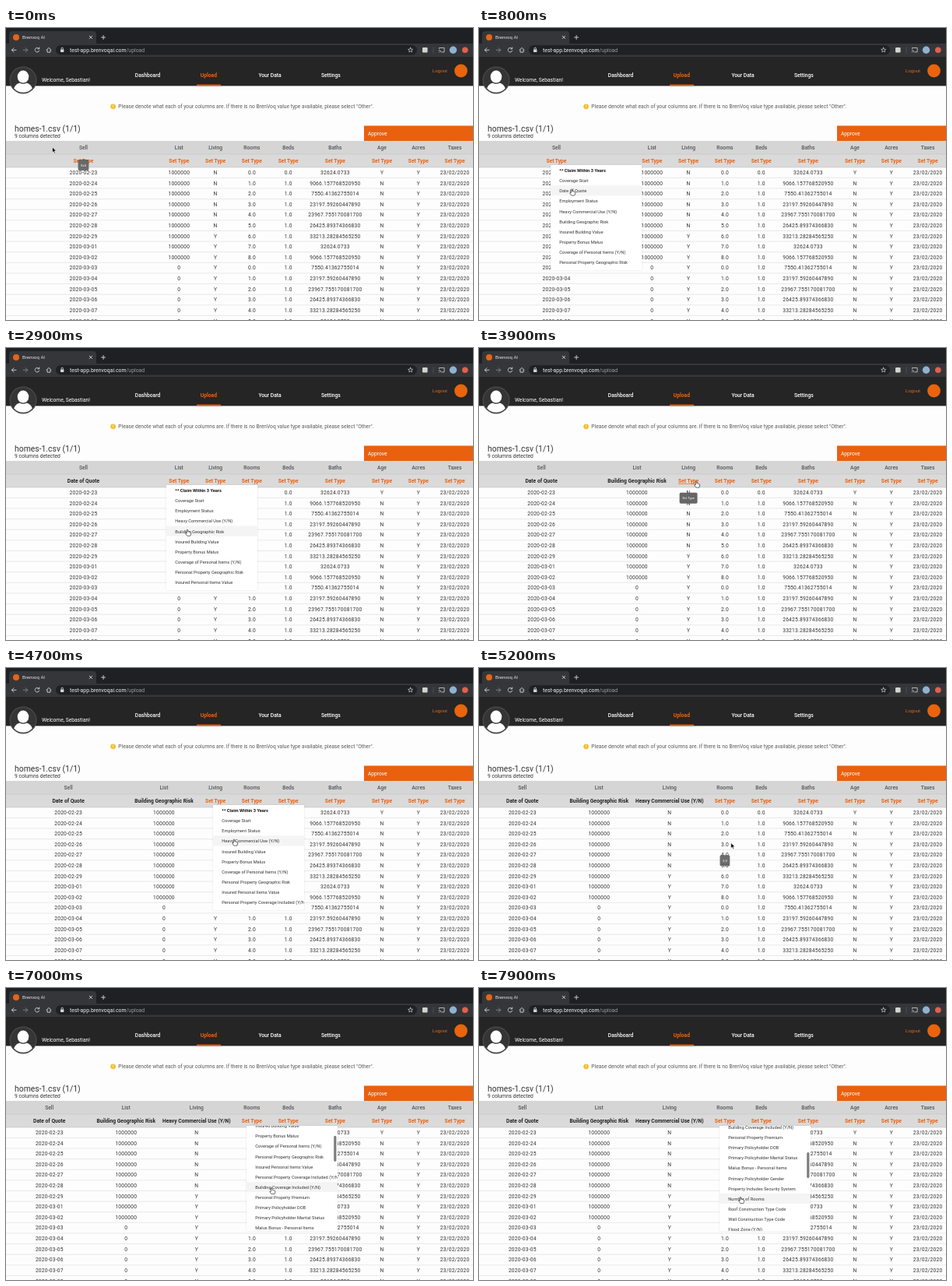
Animation, 600 px wide and 375 px high, one loop 8000 ms. Source, as an HTML page:

```html
<!DOCTYPE html>
<html lang="en">
<head>
<meta charset="utf-8">
<title>Column types</title>
<style>
html, body { margin: 0; width: 100%; height: 100%; overflow: hidden; background: #fdfdfd; }
svg { display: block; font-family: Roboto, "Open Sans", sans-serif; }
#stage { width: 600px; height: 375px; }
text { font-size: 6.7px; fill: #333; white-space: pre; }
.mid { text-anchor: middle; }
.num { letter-spacing: .2px; }
.head { font-weight: 500; fill: #555; }
.type { font-weight: 700; fill: #222; }
.type.unset { fill: #ea6314; }
.type.over { text-decoration: underline; }
.nav { font-weight: 500; fill: #fff; }
.item { font-size: 5.7px; fill: #333; }
.item.first { font-weight: 700; fill: #111; }
.menu { filter: drop-shadow(0 .5px 1px rgba(0, 0, 0, .1)); }
.tip text { font-size: 4.2px; fill: #fff; }
.line { fill: none; stroke: #d4d5d7; stroke-width: .9; stroke-linecap: round; stroke-linejoin: round; }
</style>
</head>
<body>
<svg id="stage" viewBox="0 0 600 375">
  <!-- browser bar -->
  <rect width="600" height="21" fill="#1f2023"/>
  <path d="M1 21Q4 21 4 18V8Q4 4 8 4H112Q116 4 116 8V18Q116 21 119 21Z" fill="#35363a"/>
  <rect y="20" width="600" height="17" fill="#35363a"/>
  <circle cx="13" cy="12" r="4" fill="#e8640f"/>
  <text x="21" y="14.1" style="font-size:6px;fill:#e4e5e7">Brenvoq AI</text>
  <path class="line" d="M107.2 10.2l3.4 3.4m0-3.4l-3.4 3.4M122.6 12h5M125.1 9.5v5"/>
  <path class="line" d="M13 28.3H7.5M10 25.7L7.4 28.3L10 30.9"/>
  <path class="line" d="M22.2 28.3h5.5M25.2 25.7l2.6 2.6l-2.6 2.6" style="stroke:#85878a"/>
  <path class="line" d="M42.4 26.6a2.8 2.8 0 1 0 .3 2.6M42.7 25v1.9h-1.9"/>
  <path class="line" d="M52 28.3L55 25.4L58 28.3M53 28v3.1h4V28"/>
  <rect x="64" y="22" width="464" height="12.6" rx="6.3" fill="#202124"/>
  <rect x="70" y="27.6" width="4.4" height="3.4" rx=".5" fill="#d4d5d7"/>
  <path class="line" d="M71 27.4v-1a1.2 1.2 0 0 1 2.4 0v1"/>
  <text x="82" y="30.6" style="font-size:6.9px;fill:#f0f0f1">test-app.brenvoqai.com<tspan fill="#9a9ca0">/upload</tspan></text>
  <path class="line" d="M519.7 25.2l.9 2 2.2.2-1.7 1.4.5 2.1-1.9-1.1-1.9 1.1.5-2.1-1.7-1.4 2.2-.2Z" style="stroke-width:.7"/>
  <rect x="535" y="24.9" width="6.6" height="6.6" rx="1.2" fill="#cfd6d0"/>
  <path d="M549 24.5v8" stroke="#5d5e62" stroke-width=".6"/>
  <path class="line" d="M556.5 26.5v-1h6.6v5.4h-3M556.5 28.4a2.6 2.6 0 0 1 2.4 2.5M556.5 30.6v.3" style="stroke-width:.8"/>
  <circle cx="574.5" cy="28.3" r="4.7" fill="#8fb2cf"/>
  <circle cx="589.8" cy="28.3" r="3.8" fill="#e2604a"/>
  <!-- page header -->
  <rect y="37" width="600" height="37.4" fill="#252525"/>
  <rect x="245" y="72.6" width="31" height="1.8" fill="#ea6314"/>
  <circle cx="22" cy="67" r="17.5" fill="#4a4a4b"/>
  <circle cx="22" cy="67" r="16.2" fill="#353535"/>
  <ellipse cx="22" cy="62.6" rx="7.3" ry="8" fill="#fff"/>
  <path d="M10.2 77.6Q12 71.6 17.5 70.4Q22 73 26.5 70.4Q32 71.6 33.8 77.6A15.9 15.9 0 0 1 10.2 77.6Z" fill="#fff"/>
  <text x="46" y="68.9" style="fill:#fff">Welcome, Sebastian!</text>
  <text class="nav mid" x="182" y="63.3">Dashboard</text>
  <text class="nav mid" x="260.4" y="63.3" style="fill:#ea6314;font-weight:700">Upload</text>
  <text class="nav mid" x="339" y="63.3">Your Data</text>
  <text class="nav mid" x="417.3" y="63.3">Settings</text>
  <text class="mid" x="557.5" y="57.4" style="font-size:6.2px;fill:#ea6314">Logout</text>
  <circle cx="584.5" cy="55" r="8.4" fill="#e8640f"/>
  <!-- notice and title -->
  <circle cx="137.6" cy="100.8" r="3.4" fill="#f3c02c"/>
  <path d="M137.6 98.9v2.2m0 1.2v.5" stroke="#fff" stroke-width=".8"/>
  <text x="144.3" y="103.1" style="fill:#5a5a5a">Please denote what each of your columns are. If there is no BrenVoq value type available, please select "Other".</text>
  <text x="11" y="132.6" style="font-size:10.4px">homes-1.csv (1/1)</text>
  <text x="11" y="140.9">9 columns detected</text>
  <rect x="460" y="125.5" width="140" height="19.5" fill="#e9600f"/>
  <text x="465" y="138" style="fill:#fff">Approve</text>
  <!-- table bands -->
  <rect y="145" width="600" height="17" fill="#d5d5d5"/>
  <rect y="162" width="600" height="17" fill="#dadada"/>
  <path d="M0 162H600M0 179H600" stroke="#c3c3c3" stroke-width=".6"/>
  <g id="table"></g>
  <g id="menus"></g>
  <g id="tips"></g>
  <g id="cursor" stroke-width=".6" stroke-linejoin="round">
    <path id="arrow" d="M0 0V7L1.6 5.5L2.6 7.9L3.8 7.4L2.8 5.1H5Z" fill="#000" stroke="#fff"/>
    <path id="hand" d="M-.8 .5Q0-.5 .8 .5V3Q1.6 2.6 2.1 3.2Q3 2.9 3.4 3.6Q4.5 3.4 4.6 4.5V6L3.8 8.2H-.2L-2.4 5.1Q-2.2 4-.8 5Z" fill="#fff" stroke="#111"/>
  </g>
</svg>
<script>
const LOOP = 8000, STEP = 100;
const ROWS = 15, PITCH = 13.615, FIRST_ROW = 185.5, HEADER = 171, COL_W = 46.8;
const MENU_W = 117, MENU_H = 135, ITEM = 13.13;
const $ = id => document.getElementById(id);

function add(parent, tag, attrs = {}, text) {
  const el = document.createElementNS('http://www.w3.org/2000/svg', tag);
  for (const key in attrs) el.setAttribute(key, attrs[key]);
  if (text !== undefined) el.textContent = text;
  parent.append(el);
  return el;
}
function show(el, opacity) {
  el.style.display = opacity > 0 ? '' : 'none';
  el.style.opacity = opacity;
}
const shift = (el, x, y = 0) => el.setAttribute('transform', `translate(${x} ${y})`);

// Table
const baths = ['32624.0733', '9066.157768520950', '7550.41362755014', '23197.59260447890',
  '23967.755170081700', '26425.89374366830', '33213.28284565250'];
const day = i => new Date(Date.UTC(2020, 1, 23 + i)).toISOString().slice(0, 10);
const columns = [
  { name: 'Sell', value: day },
  { name: 'List', value: i => i < 9 ? '1000000' : '0', setWidth: 85.5 },
  { name: 'Living', value: i => i < 6 ? 'N' : 'Y', setWidth: 95.5 },
  { name: 'Rooms', value: i => i % 9 + '.0' },
  { name: 'Beds', value: i => i ? '1.0' : '0.0' },
  { name: 'Baths', value: i => baths[i % 7], width: 73.5 },
  { name: 'Age', value: i => i ? 'N' : 'Y' },
  { name: 'Acres', value: () => 'Y' },
  { name: 'Taxes', value: () => '23/02/2020' }
];
for (const c of columns) {
  c.g = add($('table'), 'g');
  add(c.g, 'text', { class: 'head mid', y: 155.9 }, c.name);
  c.type = add(c.g, 'text', { y: HEADER + 2.2 });
  for (let i = 0; i < ROWS; i++)
    add(c.g, 'text', { class: 'num mid', y: FIRST_ROW + 2.4 + i * PITCH }, c.value(i));
}
for (let i = 0; i < ROWS - 1; i++)
  add($('table'), 'path', { d: `M0 ${192.4 + i * PITCH}H600`, stroke: '#dadada', 'stroke-width': .6 });

// Menus: one per column in turn; each picked type leaves the list
let types = ['** Claim Within 3 Years', 'Coverage Start', 'Date of Quote', 'Employment Status',
  'Heavy Commercial Use (Y/N)', 'Building Geographic Risk', 'Insured Building Value',
  'Property Bonus Malus', 'Coverage of Personal Items (Y/N)', 'Personal Property Geographic Risk',
  'Insured Personal Items Value', 'Personal Property Coverage Included (Y/N)',
  'Building Coverage Included (Y/N)', 'Personal Property Premium', 'Primary Policyholder DOB',
  'Primary Policyholder Marital Status', 'Malus Bonus - Personal Items', 'Primary Policyholder Gender',
  'Property Includes Security System', 'Number of Rooms', 'Roof Construction Type Code',
  'Wall Construction Type Code', 'Flood Zone (Y/N)'];
const menus = [
  { pick: 'Date of Quote', x: 92, y: 176, open: 500, close: 1100 },
  { pick: 'Building Geographic Risk', x: 206, y: 176, open: 2300, close: 3200 },
  { pick: 'Heavy Commercial Use (Y/N)', x: 266, y: 176, open: 4200, close: 4900 },
  { pick: 'Number of Rooms', x: 309, y: 177.1, open: 5800, close: 8200, scroll: 123.4 }
];
for (const m of menus) {
  m.g = add($('menus'), 'g', { class: 'menu' });
  const box = add(m.g, 'svg', { x: m.x, y: m.y, width: MENU_W, height: MENU_H });
  add(box, 'rect', { width: MENU_W, height: MENU_H, fill: '#fff' });
  m.list = add(box, 'g');
  m.hover = add(m.list, 'rect', { width: MENU_W, height: ITEM, fill: '#f4f4f4' });
  types.forEach((t, i) =>
    add(m.list, 'text', { class: i ? 'item' : 'item first', x: 11.3, y: 9.1 + i * ITEM }, t));
  m.thumb = add(box, 'rect', { x: 112.2, width: 3.2, height: 33, rx: 1.6, fill: '#7d7d7d' });
  m.pickY = m.y + (types.indexOf(m.pick) + .35) * ITEM - (m.scroll || 0);
  types = types.filter(t => t !== m.pick);
}

// Cursor: pauses on the table, and for each menu a stop on its header and on its pick
const path = [
  [0, 59.5, 153], [1600, 114, 193.5], [5200, 323.7, 224.5], [6400, 344, 250],
  ...menus.flatMap(m => [
    [m.open - 300, m.x + 13, HEADER], [m.open, m.x + 13, HEADER],
    [m.close - 300, m.x + 27, m.pickY], [m.close, m.x + 27, m.pickY]
  ])
].sort((a, b) => a[0] - b[0]);

// Tooltips hang below the hovered cell
function tip(text, col, cellY, fade) {
  const g = add($('tips'), 'g', { class: 'tip' });
  const label = add(g, 'text', { class: 'mid', y: cellY + 22.5 }, text);
  const w = label.getComputedTextLength() + 7;
  g.prepend(add(g, 'rect', { x: -w / 2, y: cellY + 14, width: w, height: 14, rx: 1.7, fill: '#5f5f5f' }));
  return { g, col, fade };
}
const brief = t => [[t - 200, 0], [t, .9], [t + 200, 0]];
const tips = [
  tip('Sell', 0, 155, brief(0)),
  tip(day(1), 0, FIRST_ROW + PITCH, brief(1600)),
  tip('3.0', 3, FIRST_ROW + 3 * PITCH, brief(5200)),
  ...menus.map((m, i) => tip('Set Type', i, HEADER + .8,
    [[m.open - 400, 0], [m.open - 300, .95], [m.open - 100, .95], [m.open, 0]]))
];

const ease = u => u * u * (3 - 2 * u);
function at(track, t, k = 1) {
  const i = track.findIndex(p => p[0] > t);
  if (i === 0) return track[0][k];
  if (i < 0) return track.at(-1)[k];
  const a = track[i - 1], b = track[i];
  return a[k] + (b[k] - a[k]) * ease((t - a[0]) / (b[0] - a[0]));
}

// Columns pack from the right; the first takes the rest
function layOut(t) {
  let right = 600;
  for (let i = columns.length - 1; i >= 0; i--) {
    const c = columns[i];
    c.set = i < menus.length && t >= menus[i].close;
    const w = i === 0 ? right : c.set ? c.setWidth : c.width || COL_W;
    c.x = right - w / 2;
    right -= w;
    shift(c.g, c.x);
  }
}

function drawMenu(m, t, y) {
  const scroll = m.scroll ? at([[6500, 0], [7700, m.scroll]], t) : 0;
  const index = Math.floor((y - m.y + scroll) / ITEM);
  shift(m.list, 0, -scroll);
  m.hover.setAttribute('y', index * ITEM);
  m.thumb.setAttribute('y', scroll * .275);
  show(m.thumb, scroll > 0 ? 1 : 0);
}

function draw(t) {
  const x = at(path, t, 1), y = at(path, t, 2);
  const hand = menus.some(m => t >= m.open - 300 && t < m.close);
  const open = menus.find(m => t >= m.open && t < m.close);

  layOut(t);
  columns.forEach((c, i) => {
    const over = hand && !open && Math.abs(x - c.x) < 15;
    c.type.textContent = c.set ? menus[i].pick : 'Set Type';
    c.type.setAttribute('class', 'type mid' + (c.set ? '' : over ? ' unset over' : ' unset'));
  });

  for (const m of menus) show(m.g, m !== open ? 0 : t < m.open + STEP ? .6 : 1);
  if (open) drawMenu(open, t, y);

  for (const p of tips) {
    shift(p.g, columns[p.col].x);
    show(p.g, at(p.fade, t));
  }

  shift($('cursor'), x, y);
  show($('hand'), hand ? 1 : 0);
  show($('arrow'), hand ? 0 : 1);
}

const start = performance.now();
function tick() {
  const t = (performance.now() - start) % LOOP;
  draw(Math.floor(t / STEP) * STEP);
  requestAnimationFrame(tick);
}
tick();
</script>
</body>
</html>
```
